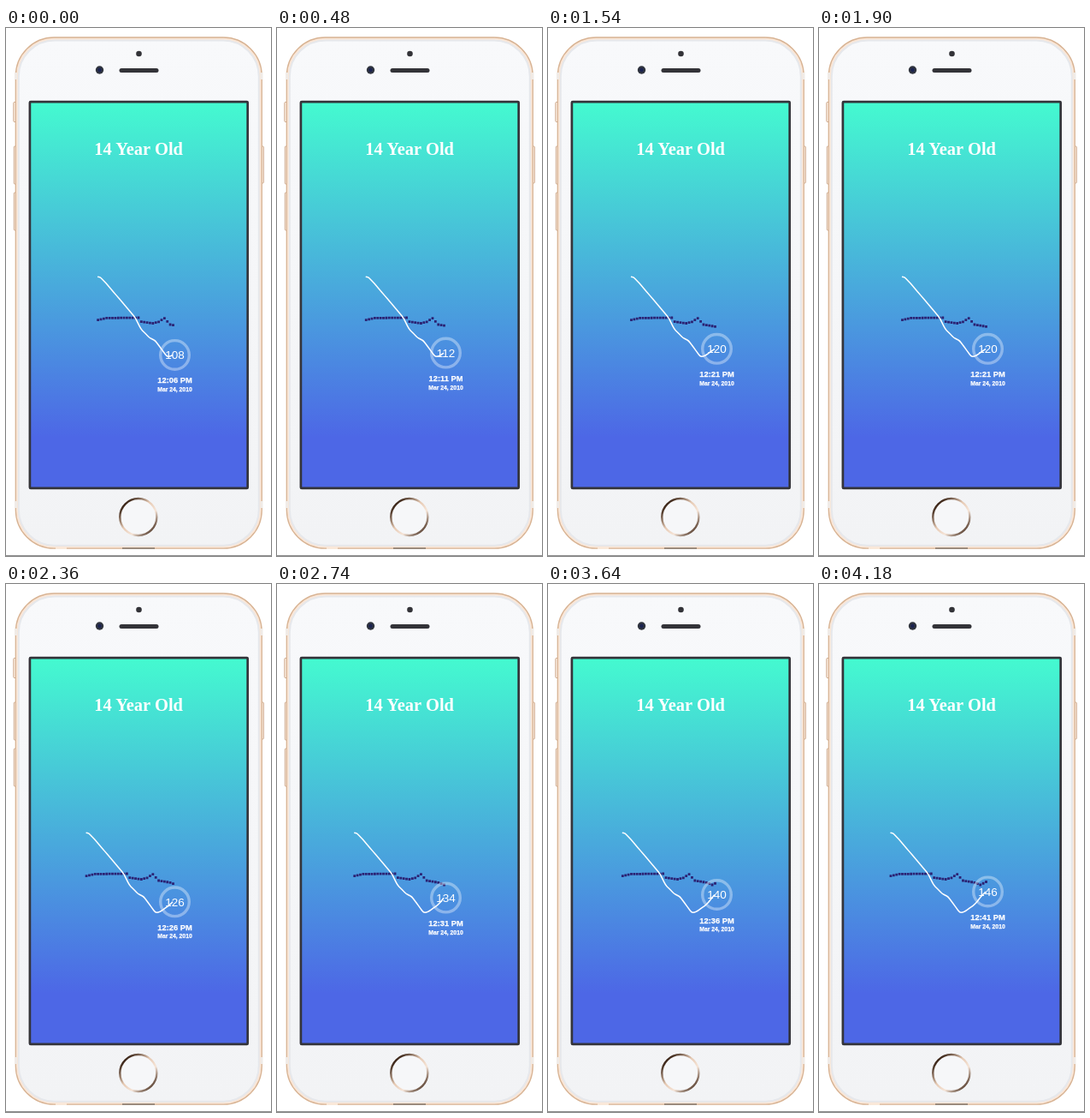
Write an HTML page that moves like this. It is 310x616 px and loops after 4.2 s.

```html
<!DOCTYPE html>
<html lang="en">
<head>
<meta charset="utf-8">
<style>
  html, body { margin: 0; width: 100%; height: 100%; overflow: hidden; background: #fff; }
  svg { display: block; }
  text { fill: #fff; text-anchor: middle; font-family: "Liberation Sans", Arial, sans-serif; }
  .title { font: bold 20.5px "Liberation Serif", Times, serif; }
  .value { font-size: 13.5px; }
  .time, .date { font-weight: bold; stroke: #fff; stroke-width: .25; }
  .time { font-size: 9.3px; }
  .date { font-size: 6.8px; }
</style>
</head>
<body>
<svg width="310" height="616" viewBox="0 0 310 616">
  <defs>
    <linearGradient id="sky" x2="0" y2="1">
      <stop stop-color="#44fad0"/>
      <stop offset=".87" stop-color="#4d67e6"/>
    </linearGradient>
    <linearGradient id="shell" x2="0" y2="1">
      <stop stop-color="#f8f9fb"/>
      <stop offset="1" stop-color="#f2f3f5"/>
    </linearGradient>
    <linearGradient id="metal" x2="1" y2="1">
      <stop offset=".15" stop-color="#3e281a"/>
      <stop offset=".45" stop-color="#e6cab4"/>
      <stop offset=".65" stop-color="#f6e5d8"/>
      <stop offset=".9" stop-color="#4e3424"/>
    </linearGradient>
  </defs>

  <!-- Phone -->
  <path d="M0 615.5H310" stroke="#8c8c8c"/>
  <g fill="#fdf0e4" stroke="#c9a285" stroke-width=".9">
    <rect x="8.8" y="86.5" width="4" height="23" rx="1"/>
    <rect x="9.3" y="138" width="4" height="44" rx="1"/>
    <rect x="9.3" y="192" width="4" height="44" rx="1"/>
    <rect x="297" y="138" width="4.4" height="43" rx="1"/>
  </g>
  <rect x="11.3" y="11" width="288" height="596.2" rx="45" fill="#f9e6d7" stroke="#d8b393" stroke-width="1.3"/>
  <path d="M11.5 52v8M299 52v8M11.5 552v8M299 552v8" stroke="#f0ebe7" stroke-width="3"/>
  <rect x="14.8" y="14.4" width="281" height="589.4" rx="42" fill="url(#shell)" stroke="#e6e8ec" stroke-width="2"/>
  <path d="M136 607H174" stroke="#9b8b7d" stroke-width="2"/>
  <path d="M58 607H71" stroke="#fff2e4" stroke-width="1.6"/>
  <circle cx="155.5" cy="30" r="3.3" fill="#333338"/>
  <circle cx="109.5" cy="49" r="4.7" fill="#30343e"/>
  <circle cx="109.5" cy="49" r="2.4" fill="#1c2450"/>
  <rect x="132.5" y="47" width="46" height="5" rx="2.5" fill="#333338"/>
  <circle cx="154.8" cy="570.5" r="21.5" fill="#f6f7f9" stroke="url(#metal)" stroke-width="2.4"/>
  <rect x="27.9" y="86.1" width="254.8" height="450.8" rx="1" fill="url(#sky)" stroke="#34343a" stroke-width="2.7"/>

  <!-- Chart -->
  <text class="title" x="155.2" y="148">14 Year Old</text>
  <path id="dots" fill="#2b2273"/>
  <path id="line" fill="none" stroke="#fff" stroke-width="1.5" stroke-linejoin="round"/>
  <g id="marker">
    <circle r="16.8" fill="none" stroke="#fff" stroke-opacity=".36" stroke-width="3.4"/>
    <text class="value" id="value" y="4.7"></text>
    <text class="time" id="time" y="33"></text>
    <text class="date" y="42.7">Mar 24, 2010</text>
  </g>
</svg>
<script>
const LOOP = 4200, STEP = 600, GAP = 3.38, END = 195, FIRST = 26;
const $ = id => document.getElementById(id);

// Linear curve through [sample, value] key points
const curve = keys => i => {
  const k = Math.max(1, keys.findIndex(key => key[0] >= i));
  const [i0, v0] = keys[k - 1], [i1, v1] = keys[k];
  return v0 + (v1 - v0) * (i - i0) / (i1 - i0);
};
const level = curve([[0, 262], [1, 261], [3, 249], [13, 182], [15, 159], [18, 142], [20, 136],
  [24, 105], [25, 105], [26, 108], [29, 120], [30, 126], [31, 134], [33, 146]]);
const dotY = curve([[0, 340.6], [3, 338.4], [14, 338], [15, 342.6], [19, 344.5],
  [21, 342.8], [23, 338.6], [25, 346], [29, 348.3], [31, 351], [33, 347.5]]);
const lineY = i => 445.4 - 0.592 * level(i);

let shown = -1;

function draw(step) {
  const last = FIRST + step;
  const x = i => END - (last - i) * GAP;
  let line = `M${x(0)} ${lineY(0)}`, dots = "";
  for (let i = 0; i <= last; i++) {
    dots += `M${x(i) - 0.9} ${dotY(i) - 1.4}h2.8v2.8h-2.8z`;
    // Round each corner by ending at the midpoint to the next sample
    if (i < last) line += `Q${x(i)} ${lineY(i)} ${x(i + 0.5)} ${lineY(i + 0.5)}`;
  }
  $("line").setAttribute("d", `${line}L${x(last)} ${lineY(last)}`);
  $("dots").setAttribute("d", dots);

  $("marker").setAttribute("transform", `translate(197.5 ${lineY(last)})`);
  $("value").textContent = Math.round(level(last));
  $("time").textContent = `12:${String(6 + 5 * step).padStart(2, "0")} PM`;
}

function tick() {
  const t = performance.now() % LOOP;
  const step = Math.floor(t / STEP + 0.5);
  if (step !== shown) draw(shown = step);
  requestAnimationFrame(tick);
}
tick();
</script>
</body>
</html>
```
